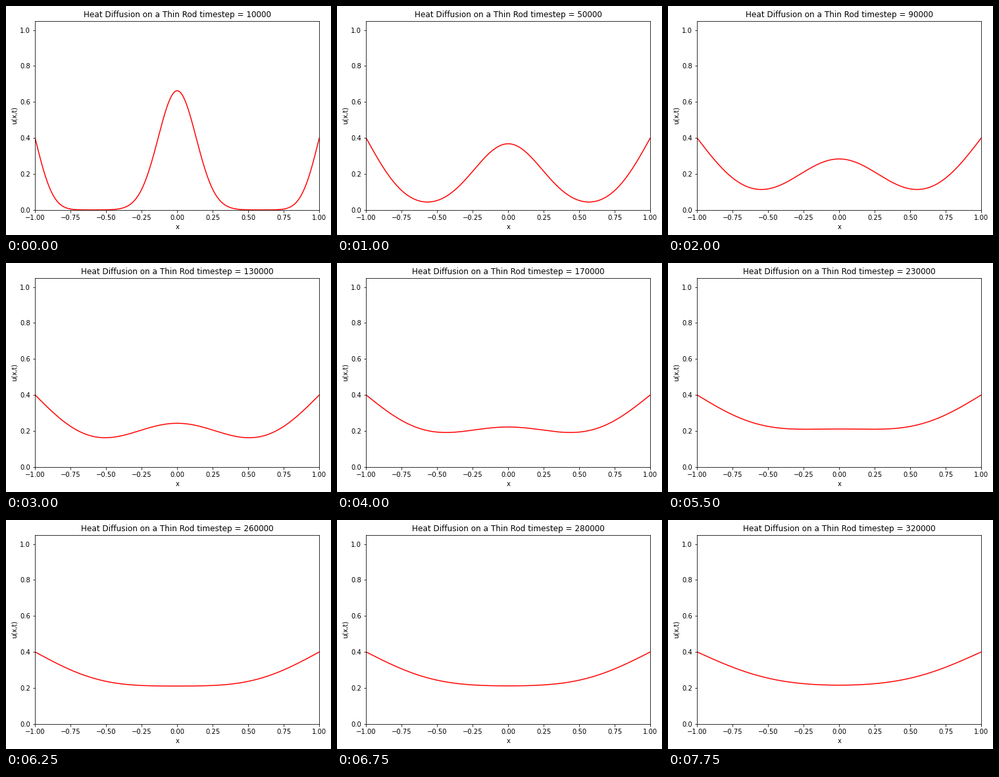
These frames come from a looping animation (494x349 px, 8000 ms). A matplotlib script:

```python
import numpy as np
import matplotlib.pyplot as plt
from matplotlib.animation import FuncAnimation

W, H, DPI = 494, 349, 72
FRAMES, INTERVAL = 32, 250
STEPS_PER_FRAME = 10000
DIFFUSION = 5e-7      # diffusivity times the length of one step
WIDTH_SQ = 1 / 64     # the rod starts as exp(-x^2 / WIDTH_SQ)
EDGE = 0.4            # fixed value at both ends

plt.rcParams["font.family"] = "DejaVu Sans"

x = np.linspace(-1, 1, 401)
m = np.arange(40)
k = (2 * m + 1) * np.pi / 2
modes = np.cos(np.outer(x, k))
amps = (np.sqrt(np.pi * WIDTH_SQ) * np.exp(-k**2 * WIDTH_SQ / 4)
        - 2 * EDGE * (-1.0)**m / k)


def heat(step):
    """Temperature along the rod as a sum of decaying cosine modes."""
    return EDGE + modes @ (amps * np.exp(-k**2 * DIFFUSION * step))


fig = plt.figure(figsize=((W + 1e-6) / DPI, (H + 1e-6) / DPI), dpi=DPI,
                 facecolor="white")
ax = fig.add_axes([44.2 / W, 38.2 / H, 432 / W, 288 / H])
ax.set_xlim(-1, 1)
ax.set_ylim(0, 1.05)
ax.set_xticks(np.linspace(-1, 1, 9))
ax.set_yticks(np.linspace(0, 1, 6))
ax.set_xlabel("x")
ax.set_ylabel("u(x,t)")
title = ax.set_title("")
line, = ax.plot([], [], color="red", lw=1.5)


def update(i):
    step = (i + 1) * STEPS_PER_FRAME
    line.set_data(x, heat(step))
    title.set_text(f"Heat Diffusion on a Thin Rod timestep = {step}")
    return line, title


anim = FuncAnimation(fig, update, frames=FRAMES, interval=INTERVAL,
                     init_func=lambda: update(0), repeat=True,
                     repeat_delay=0, blit=False)
plt.show()
```
